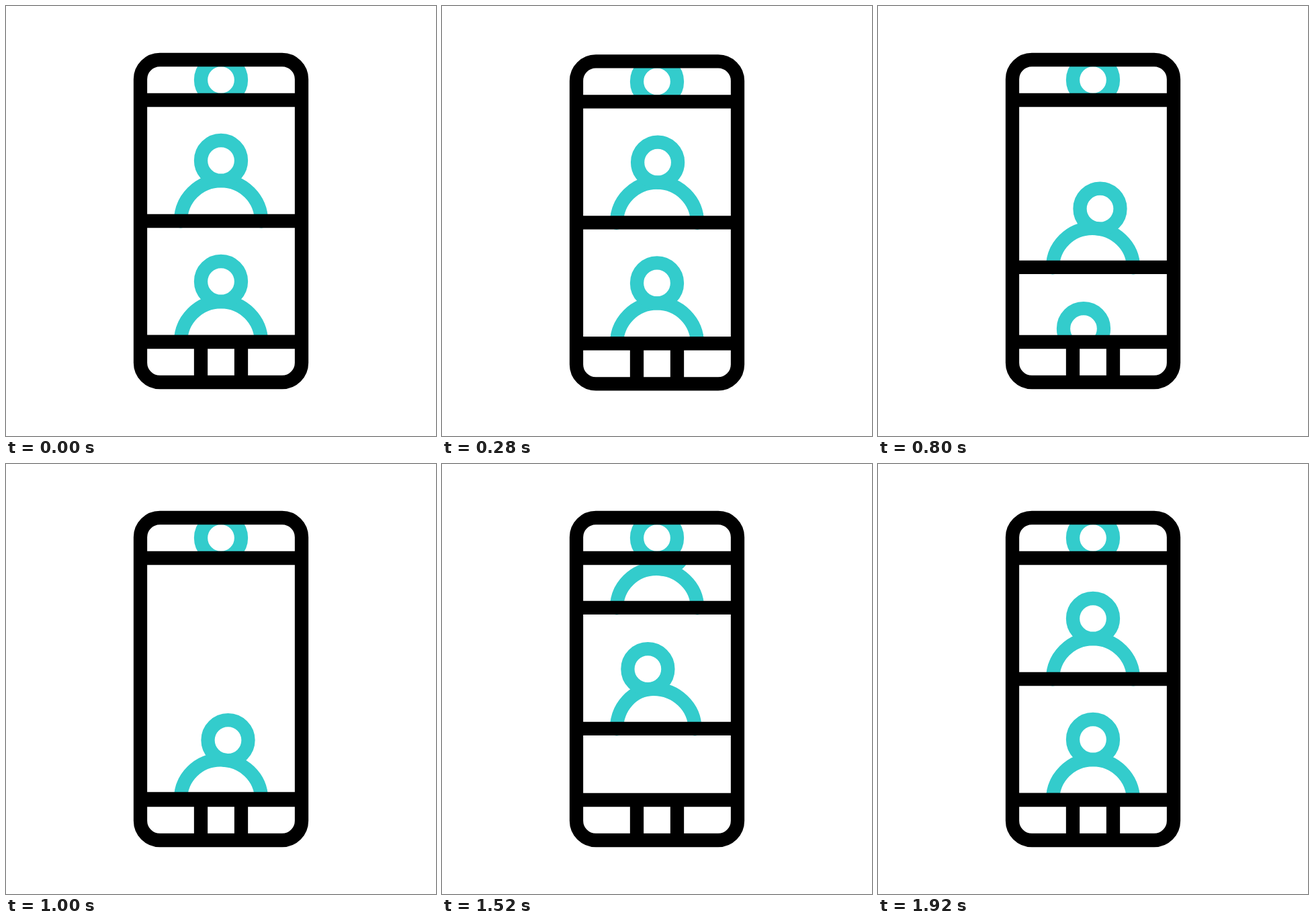
These frames come from a looping animation (640x640 px, 2 s). An HTML page:

```html
<!DOCTYPE html>
<html lang="en">
<head>
<meta charset="utf-8">
<title>Video call list</title>
<style>
  html, body { margin: 0; width: 100%; height: 100%; overflow: hidden; background: #fff; }
  svg { display: block; width: 100vw; height: 100vh; }
  .line { fill: none; stroke: #000; stroke-width: 20.3; }
  .person { fill: none; stroke: #3cc; stroke-width: 20.3; stroke-linecap: round; }
</style>
</head>
<body>
<svg viewBox="0 0 640 640">
  <defs>
    <clipPath id="screen"><rect x="200" y="140" width="240" height="360"/></clipPath>
    <clipPath id="status"><rect x="200" y="80" width="240" height="60"/></clipPath>
    <g id="list">
      <g class="person" id="upper"><path/><circle r="30"/></g>
      <g class="person" id="lower" transform="translate(0 180)"><path/><circle r="30"/></g>
      <path class="line" d="M200 320H440M200 500H440"/>
    </g>
  </defs>
  <g id="phone">
    <g clip-path="url(#status)"><circle class="person" cx="320" cy="110" r="30"/></g>
    <g clip-path="url(#screen)">
      <use id="leaving" href="#list"/>
      <use id="arriving" href="#list"/>
    </g>
    <rect class="line" x="200" y="80" width="240" height="480" rx="29"/>
    <path class="line" d="M200 140H440M200 500H440M290 500V560M350 500V560"/>
  </g>
</svg>
<script>
const LOOP = 2000, STEP = 40;
const $ = id => document.getElementById(id);

// [time, value] keys, eased in and out between neighbours
const tracks = {
  bounce: [[40, 0], [160, 27], [360, -11], [520, 0]],
  upper: [[200, 0], [600, 1], [1580, 1], [1920, 0]],
  lower: [[320, 0], [720, 1], [1480, 1], [1880, 0]]
};

// Full lean: head shift, shoulder apex shift, right end shift
const leans = {
  upper: { head: [10.5, 2.8], apex: [-1, 2], end: 0 },
  lower: { head: [-14, 1.3], apex: [-5.5, 1], end: -3.6 }
};

// Steady scroll with short ramps at both ends
const scroll = { start: 608, end: 1780, ramp: 132, speed: 0.547 };
const travel = scroll.speed * (scroll.end - scroll.start - scroll.ramp);

function valueAt(keys, t) {
  if (t <= keys[0][0]) return keys[0][1];
  for (let i = 1; i < keys.length; i++) {
    const [t0, a] = keys[i - 1], [t1, b] = keys[i];
    if (t < t1) {
      const u = (t - t0) / (t1 - t0);
      return a + (b - a) * u * u * (3 - 2 * u);
    }
  }
  return keys[keys.length - 1][1];
}

function scrollAt(t) {
  const { start, end, ramp, speed } = scroll;
  const covered = x => x <= 0 ? 0 : x < ramp ? speed * x * x / (2 * ramp) : speed * (x - ramp / 2);
  return t < (start + end) / 2 ? covered(t - start) : travel - covered(end - t);
}

function pose(name, p) {
  const { head, apex, end } = leans[name];
  const [path, circle] = $(name).children;
  const left = 260, right = 380 + end * p, base = 320.4;
  const x = 320 + apex[0] * p, y = 260 + apex[1] * p;
  const k = 0.5523, h = (base - y) * k;
  path.setAttribute("d",
    `M${left} ${base}C${left} ${base - h} ${x - (x - left) * k} ${y} ${x} ${y}` +
    `C${x + (right - x) * k} ${y} ${right} ${base - h} ${right} ${base}`);
  circle.setAttribute("cx", 320 + head[0] * p);
  circle.setAttribute("cy", 230 + head[1] * p);
}

const moveY = (id, y) => $(id).setAttribute("transform", `translate(0 ${y})`);

function draw(now) {
  const t = Math.floor((now % LOOP) / STEP) * STEP;
  const y = scrollAt(t);
  moveY("phone", valueAt(tracks.bounce, t));
  moveY("leaving", y);
  moveY("arriving", y - travel);
  for (const name in leans) pose(name, valueAt(tracks[name], t));
}

const begin = performance.now();
function tick() {
  draw(performance.now() - begin);
  requestAnimationFrame(tick);
}
tick();
</script>
</body>
</html>
```
